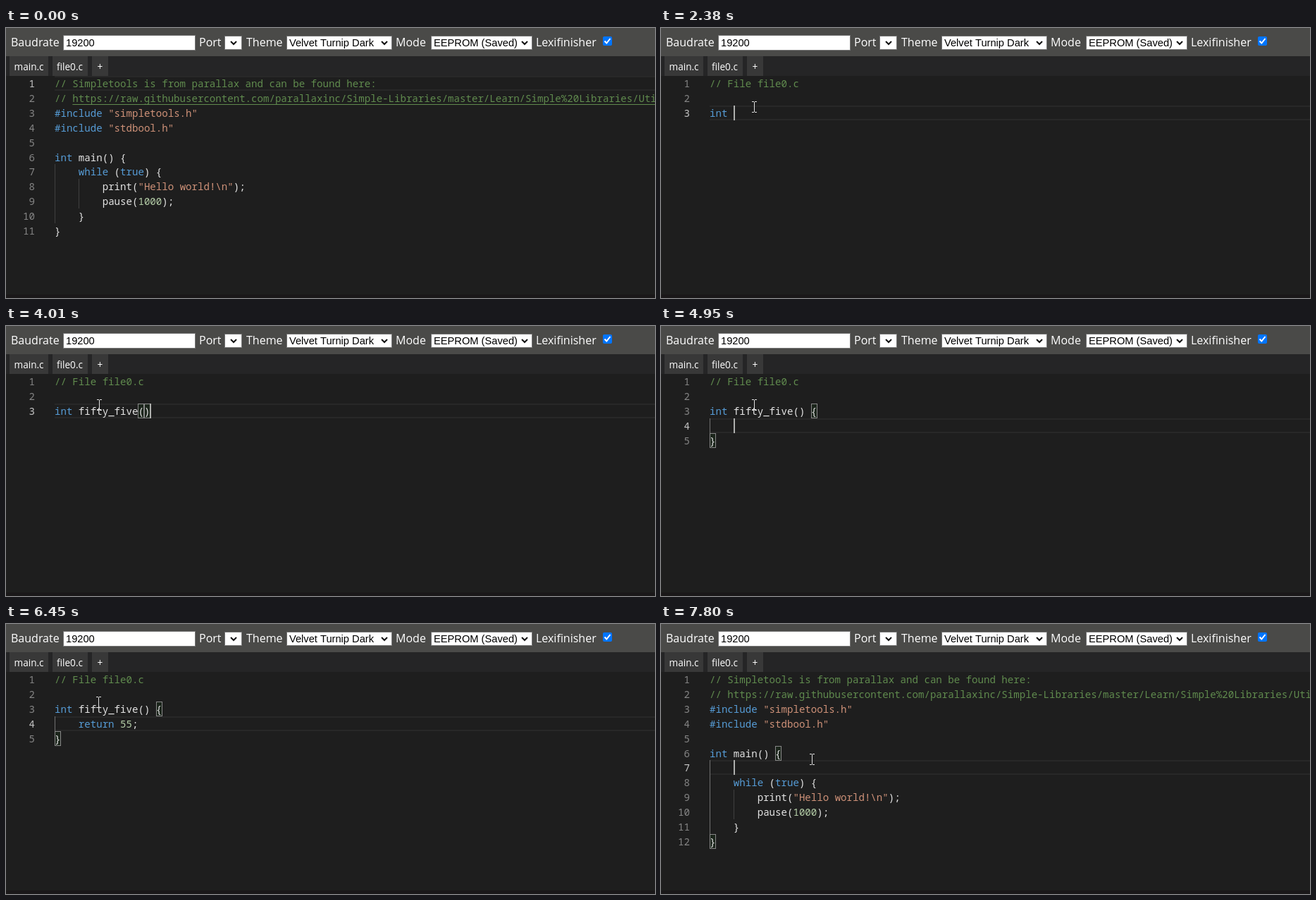
An HTML page with a canvas for the animation above (8000 ms loop, 921x383 px).

```html
<!DOCTYPE html>
<html lang="en">
<head>
<meta charset="utf-8">
<title>Code editor</title>
<style>
  html, body { margin: 0; width: 100%; height: 100%; overflow: hidden; background: #1e1e1e; }
  canvas { display: block; }
</style>
</head>
<body>
<canvas id="stage" width="921" height="383"></canvas>
<script>
const g = document.getElementById('stage').getContext('2d');
const LOOP = 8000, LEFT = 69, TOP = 68, CHAR = 8.46, LINE = 20.9;
const MONO = '14.1px "Noto Sans Mono", monospace';
const UI = '"Open Sans", sans-serif';
const FORM = '14.67px "Liberation Sans", sans-serif';

const MAIN = [
  '// Simpletools is from parallax and can be found here:',
  '// https://raw.githubusercontent.com/parallaxinc/Simple-Libraries/master/Learn/Simple%20Libraries/Utility/libsimpletools/simpletools.h',
  '#include "simpletools.h"',
  '#include "stdbool.h"',
  '',
  'int main() {',
  '    while (true) {',
  '        print("Hello world!\\n");',
  '        pause(1000);',
  '    }',
  '}'
];
const HEAD = 'int fifty_five() {}', BODY = '    return 55;';
const HEAD_TIMES = [2110, 2190, 2280, 2380, 2450, 2530, 2610, 3020, 3190, 3390,
  3530, 3600, 3660, 3800, 3870, 4010, 4310, 4400, 4480];
const BODY_TIMES = [5180, 5250, 5320, 5400, 5470, 5540, 5610, 5750, 5850, 5950];
const SWITCH = 980, FOCUS = 1380, NEWLINE = 1740, STEP_LEFT = 4750, ENTER = 4950;
const BLINK = 6450, BACK = 6900, REFOCUS = 7330, INSERT = 7800;

const TABS = [[5, 55, 'main.c', 11.5], [66, 50, 'file0.c', 72], [122, 23, '+', 129.5]];
const CLICKS = [[910, 980], [1190, 1380], [6850, 6920], [7270, 7500]];
const PATH = [[130, 454, 329], [740, 95, 64], [1000, 95, 64], [1190, 132, 112],
  [6425, 132, 112], [6800, 32, 58], [6940, 32, 58], [7240, 214, 192]];

const typed = (times, t) => times.filter(at => at <= t).length;
const colX = col => LEFT + col * CHAR;
const rowY = row => Math.round(TOP + row * LINE);

function rect(x, y, w, h, fill) {
  g.fillStyle = fill;
  g.fillRect(x, y, w, h);
}

function frame(x, y, w, h, color) {
  g.strokeStyle = color;
  g.lineWidth = 1;
  g.strokeRect(Math.round(x) + .5, Math.round(y) + .5, Math.round(w) - 1, Math.round(h) - 1);
}

function text(s, x, y, color, font) {
  g.font = font;
  g.fillStyle = color;
  g.fillText(s, x, y);
}

function line(points, color, width) {
  g.beginPath();
  points.forEach(([x, y]) => g.lineTo(x, y));
  g.strokeStyle = color;
  g.lineWidth = width;
  g.stroke();
}

function pointerAt(t) {
  if (t < PATH[0][0]) return null;
  const i = PATH.findIndex(p => p[0] > t);
  if (i < 0) return PATH[PATH.length - 1].slice(1);
  const [t0, x0, y0] = PATH[i - 1], [t1, x1, y1] = PATH[i];
  const u = (t - t0) / (t1 - t0), e = u * u * (3 - 2 * u);
  return [x0 + (x1 - x0) * e, y0 + (y1 - y0) * e];
}

// What the editor shows: lines, active row, caret column, boxed brackets, suggestions
function mainState(t) {
  const lines = MAIN.slice();
  if (t < BACK) return { lines, row: 0, brackets: [], link: true };
  if (t < REFOCUS) return { lines, row: 0, brackets: [] };
  const inserted = t >= INSERT;
  if (inserted) lines.splice(6, 0, '    ');
  return {
    lines, row: inserted ? 6 : 5, caret: inserted ? 4 : 12,
    brackets: [[5, 11], [lines.length - 1, 0]], activeGuide: true
  };
}

function fileState(t) {
  const lines = ['// File file0.c', ''];
  if (t < NEWLINE) return { lines, row: t < FOCUS ? 0 : 1, caret: t < FOCUS ? undefined : 0, brackets: [] };
  if (t >= ENTER) {
    const n = typed(BODY_TIMES, t), caret = 4 + n;
    lines.push(HEAD.slice(0, -1), BODY.slice(0, caret), '}');
    return {
      lines, row: 3, caret: t < BLINK ? caret : undefined,
      brackets: [[2, 17], [4, 0]], activeGuide: true,
      hints: n === 6 ? ['return'] : [], match: 6
    };
  }
  const n = typed(HEAD_TIMES, t);
  // An opening bracket brings its closing one with it
  const shown = n === 15 || n === 18 ? n + 1 : n;
  lines.push(HEAD.slice(0, shown));
  return {
    lines, row: 2, caret: t >= STEP_LEFT ? n - 1 : n,
    brackets: shown === 16 || shown === 19 ? [[2, shown - 2], [2, shown - 1]] : [],
    hints: n === 6 ? ['File', 'file0'] : [], match: 2
  };
}

function drawCode(s, row) {
  const tokens = /(\/\/.*)|("[^"]*")|(#include|\b(?:int|while|true|return)\b)|(\b\d+\b)|\S/g;
  const colors = ['#608b4e', '#ce9178', '#569cd6', '#b5cea8'];
  for (const m of s.matchAll(tokens)) {
    const kind = m.slice(1).findIndex(Boolean);
    text(m[0], colX(m.index), rowY(row) + 16, colors[kind] || '#e4e4e4', MONO);
  }
}

function drawHints(x, y, hints, match) {
  const h = 22 * hints.length + 2.5;
  rect(x, y, 475, h, '#252526');
  frame(x, y, 475, h, '#454545');
  rect(x + 1, y + 1, 473, 22, '#094771');
  hints.forEach((word, i) => {
    const top = y + 22 * i;
    frame(x + 6, top + 3, 15, 15, '#e8e0d0');
    for (let k = 8; k < 20; k += 3) rect(x + k, top + 17, 1, 1, '#094771');
    text(word.slice(0, match), x + 26, top + 16, '#18a3ff', 'bold ' + MONO);
    text(word.slice(match), x + 26 + match * CHAR, top + 16, '#d4d4d4', MONO);
  });
}

function drawEditor(s) {
  const y = rowY(s.row);
  rect(LEFT, y, 852, 2, '#282828');
  rect(LEFT, y + 19, 852, 2, '#282828');
  s.lines.forEach((content, i) => {
    const top = rowY(i), indent = content.search(/\S|$/);
    for (let col = 0; col < Math.min(indent, 8); col += 4)
      rect(Math.round(colX(col)), top, 1, rowY(i + 1) - top, s.activeGuide && !col ? '#707070' : '#404040');
    g.textAlign = 'right';
    text(i + 1, 41, top + 16, i === s.row ? '#c6c6c6' : '#858585', MONO);
    g.textAlign = 'left';
  });
  s.brackets.forEach(([row, col]) => {
    rect(colX(col), rowY(row), CHAR, 20, 'rgba(0,100,0,.1)');
    frame(colX(col), rowY(row), 9, 21, '#888');
  });
  s.lines.forEach(drawCode);
  if (s.link) rect(colX(3), rowY(1) + 19, 921, 1, '#608b4e');
  if (s.caret !== undefined) rect(Math.round(colX(s.caret)), y, 2, 21, '#aeafad');
  if (s.hints && s.hints.length)
    drawHints(Math.round(colX(s.caret)), rowY(s.row + 1), s.hints, s.match);
}

function drawField(x, y, w, h, value, chevron) {
  rect(x, y, w, h, '#fff');
  frame(x, y, w, h, '#767676');
  text(value, x + 4, 26, '#000', FORM);
  if (chevron) line([[chevron - 4, 19], [chevron, 23], [chevron + 4, 19]], '#111', 2);
}

function drawToolbar() {
  rect(0, 0, 921, 40, '#4a4a48');
  [['Baudrate', 7], ['Port', 274], ['Theme', 341], ['Mode', 553], ['Lexifinisher', 752]]
    .forEach(([label, x]) => text(label, x, 26, '#fff', '16px ' + UI));
  drawField(81, 10, 188, 22, '19200');
  drawField(310, 11, 25, 20, '', 323);
  drawField(398, 11, 150, 20, 'Velvet Turnip Dark', 537);
  drawField(603, 11, 144, 20, 'EEPROM (Saved)', 736);
  g.beginPath();
  g.roundRect(847, 12, 13, 13, 2);
  g.fillStyle = '#0075ff';
  g.fill();
  line([[849.5, 18.5], [852.3, 21.5], [857.5, 15]], '#fff', 2);
}

function drawTabs(pointer) {
  rect(0, 40, 921, 28, '#252526');
  for (const [x, w, label, tx] of TABS) {
    const hover = pointer && pointer[0] >= x && pointer[0] < x + w && pointer[1] >= 40 && pointer[1] < TOP;
    rect(x, 40, w, 28, hover ? '#6b6b6b' : '#383838');
    text(label, tx, 60, '#fff', '13.6px ' + UI);
  }
}

function drawPointer([x, y], clicked) {
  if (clicked) {
    g.beginPath();
    g.arc(x - 1, y - 1, 12, 0, 7);
    g.fillStyle = 'rgba(205,198,20,.8)';
    g.fill();
  }
  g.save();
  g.translate(Math.round(x), Math.round(y));
  if (y < TOP) {
    g.beginPath();
    [[0, 0], [0, 15], [3.5, 12], [6, 17.5], [8.5, 16.5], [6, 11], [10.5, 11]].forEach(p => g.lineTo(...p));
    g.closePath();
    g.fillStyle = '#fff';
    g.fill();
    g.strokeStyle = '#222';
    g.lineWidth = .8;
    g.stroke();
  } else {
    rect(0, -7, 1, 14, '#e0e0e0');
    for (const top of [-8, 7]) {
      rect(-3, top, 3, 1, '#e0e0e0');
      rect(1, top, 3, 1, '#e0e0e0');
    }
  }
  g.restore();
}

function draw(t) {
  const pointer = pointerAt(t);
  rect(0, 0, 921, 383, '#1e1e1e');
  drawEditor(t >= SWITCH && t < BACK ? fileState(t) : mainState(t));
  rect(0, 378, 921, 5, '#1a1819');
  drawToolbar();
  drawTabs(pointer);
  if (pointer) drawPointer(pointer, CLICKS.some(([from, to]) => t >= from && t < to));
}

const start = performance.now();
function tick() {
  draw((performance.now() - start) % LOOP);
  requestAnimationFrame(tick);
}
tick();
</script>
</body>
</html>
```
